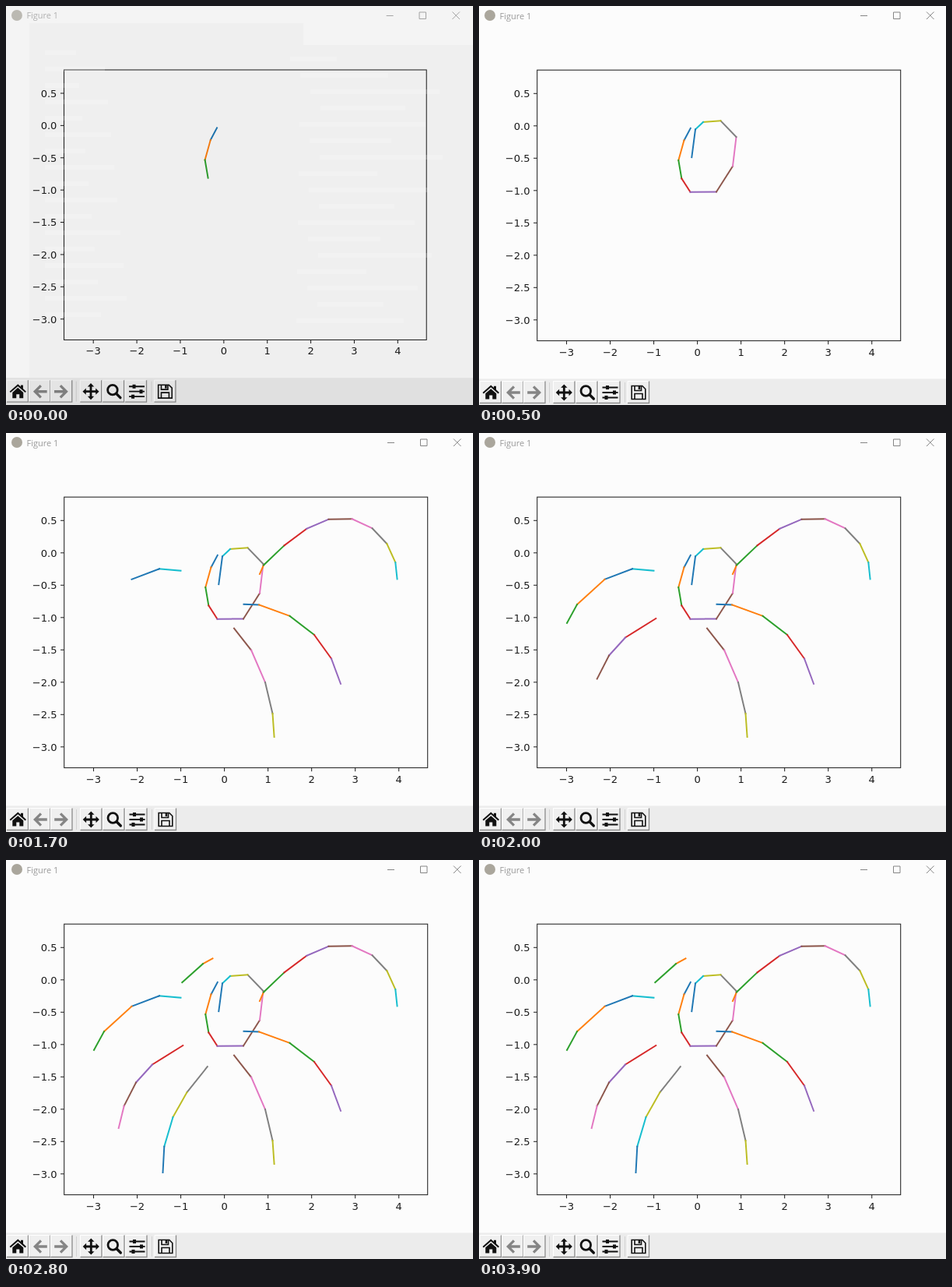
Write an HTML page that moves like this. It is 600 px wide and 512 px high and loops after 4 s.

```html
<!DOCTYPE html>
<html lang="en">
<head>
<meta charset="utf-8">
<title>Figure 1</title>
<style>
  html, body { margin: 0; width: 100%; height: 100%; overflow: hidden; background: #fcfcfc; }
  svg { display: block; width: 600px; height: 512px; }
  .title { font: 11px "Open Sans", "Noto Sans", sans-serif; fill: #999; }
  .labels { font: 13.08px "DejaVu Sans", sans-serif; fill: #1c1c1c; }
  .axes { fill: none; stroke: #222; stroke-width: 1.05; }
  .controls { fill: none; stroke: #858585; stroke-width: 1; }
  .plot { fill: none; stroke-width: 1.96; stroke-linecap: square; }
  .line { fill: none; stroke: #111; }
  .off { fill: #858585; }
</style>
</head>
<body>
<svg viewBox="0 0 600 512">
  <rect width="600" height="512" fill="#fcfcfc"/>
  <g id="window">
    <circle cx="14" cy="12" r="7" fill="#aaa69c"/>
    <text class="title" x="26.5" y="16.5">Figure 1</text>
    <path class="controls" d="M490 12.5h9M532.5 8h8.5v8.5h-8.5zM575 7.5l9.5 9.5M584.5 7.5l-9.5 9.5"/>

    <g class="axes" id="axes"><rect x="74.7" y="82.2" width="467" height="347.4"/></g>
    <g class="labels" id="labels"></g>
    <g class="plot" id="plot"></g>

    <rect y="478.5" width="604" height="37" fill="#ececec"/>
    <g id="buttons"></g>
    <path d="M90.5 483v26M187.5 483v26" stroke="#d2d2d2"/>

    <path d="M15.3 486.5l3.7 3.2v-2h3v4.6l4 3.7-1.3 1.4-9.4-8.2-9.4 8.2-1.3-1.4z" fill="#111"/>
    <path d="M15.3 491.2l7 6.1v7.2h-5v-5h-4v5h-5v-7.2z" fill="#111"/>
    <path id="arrow" class="off" d="M35 496l8.8-8.8 2.3 2.3-4.7 4.8h11.4v3.5H41.4l4.7 4.7-2.3 2.3z"/>
    <use href="#arrow" transform="matrix(-1 0 0 1 115 0)"/>
    <g transform="translate(109.3 496)" fill="#111">
      <path d="M-7-1.4H7v2.8H-7zM-1.4-7h2.8V7h-2.8z"/>
      <path id="tip" d="M0-10.6l4.2 4.4h-8.4z"/>
      <use href="#tip" transform="rotate(90)"/>
      <use href="#tip" transform="rotate(180)"/>
      <use href="#tip" transform="rotate(270)"/>
    </g>
    <circle class="line" cx="137.3" cy="494" r="6.3" stroke-width="2.8"/>
    <path class="line" d="M142.3 499l5 5" stroke-width="3.4" stroke-linecap="round"/>
    <path class="line" d="M158.5 489.5h20M158.5 496h20M158.5 502.5h20" stroke-width="1.9"/>
    <path class="line" d="M165 487v5M174 493.5v5M163.5 500v5" stroke-width="4"/>
    <path class="line" d="M196.2 487.5h13.6l4 4v13h-17.600zM200 504v-6.500h10v6.500M200 488v5.500h8.500v-5.500" stroke-width="1.6"/>
    <path d="M204.700 488h2.500v4h-2.500z" fill="#111"/>
  </g>

  <g id="fade">
    <rect width="600" height="512" fill="#000" opacity=".05"/>
    <path d="M0 0h600v22H0zM0 22h30v455H0zM382 22h218v28H382z" fill="#fff" opacity=".28"/>
    <path id="ghost" fill="none" stroke="#fff" stroke-width="6" opacity=".18"/>
  </g>
</svg>
<script>
const $ = id => document.getElementById(id);
const LOOP = 4000, STEP = 100;
const cycle = ['#1f77b4', '#ff7f0e', '#2ca02c', '#d62728', '#9467bd',
               '#8c564b', '#e377c2', '#7f7f7f', '#bcbd22', '#17becf'];

// Strokes of the drawing, in the order they appear
const strokes = [
  '271.8,156.8 263.5,172.3 256.3,198 260.3,221.3 271.5,238.7 305,238.5 326,205.5 330.5,168 310.5,147.3 288,149 278,158.3 273.3,194.2',
  '326,181 331,169.5 357.5,144.3 386,123 414.5,110.7 444.5,110.2 470.5,122.3 489.3,142 500.3,166 502.6,187.5',
  '305.5,219.7 325,220.5 364.5,234.8 396,259 418,289.5 430,321.8',
  '293,250.7 315,278.5 333,320 342.5,360 344.6,390',
  '224.5,176.7 197,174.3 161.5,187.8 126,220 113,243.8',
  '227.3,238 188,262.5 167,285.5 151.7,315.5 144.7,344',
  '258.8,265.2 232.5,298 214.5,330 203.3,367.7 201.5,401',
  '265.5,126.4 253,133.2 226.3,157'
];

function add(parent, tag, attrs, text = '') {
  const el = document.createElementNS('http://www.w3.org/2000/svg', tag);
  for (const key in attrs) el.setAttribute(key, attrs[key]);
  el.textContent = text;
  return parent.appendChild(el);
}

const minus = text => text.replace('-', '\u2212');

for (let v = -3; v <= 4; v++) {
  const x = 280.6 + v * 56.03;
  add($('axes'), 'path', { d: `M${x} 429.600v4.600` });
  add($('labels'), 'text', { x, y: 448.6, 'text-anchor': 'middle' }, minus(String(v)));
}
for (let i = -6; i <= 1; i++) {
  const y = 153.8 - i * 41.5;
  add($('axes'), 'path', { d: `M74.700 ${y}h-4.600` });
  add($('labels'), 'text', { x: 65.6, y: y + 4.9, 'text-anchor': 'end' }, minus((i / 2).toFixed(1)));
}

for (const x of [1, 29.5, 57.5, 95.5, 124.5, 153.5, 191]) {
  add($('buttons'), 'rect', { x, y: 481.5, width: 27.5, height: 28, fill: '#f0f0f0' });
  add($('buttons'), 'path', { d: `M${x} 509.500v-28h27.500`, fill: 'none', stroke: '#fff' });
  add($('buttons'), 'path', { d: `M${x} 509.500h27.500v-28`, fill: 'none', stroke: '#8c8c8c', 'stroke-width': 1.3 });
}

const segments = [];
for (const stroke of strokes) {
  const pts = stroke.split(' ');
  for (let i = 1; i < pts.length; i++) {
    segments.push(add($('plot'), 'path', {
      d: `M${pts[i - 1]}L${pts[i]}`,
      stroke: cycle[segments.length % cycle.length]
    }));
  }
}

// Faint rows of text showing through while the window opens
let rows = '';
for (let i = 0; i < 17; i++) {
  const y = 60 + i * 21;
  rows += `M50 ${y}h${40 + i * 37 % 70}M${365 + i * 13 % 40} ${y + 8}h${60 + i * 53 % 110}`;
}
$('ghost').setAttribute('d', rows);

function draw() {
  const step = Math.floor(performance.now() % LOOP / STEP);
  const shown = Math.floor(3 + step * 5 / 3);
  segments.forEach((s, i) => s.setAttribute('visibility', i < shown ? 'visible' : 'hidden'));
  $('window').setAttribute('transform', step ? '' : 'scale(.9973)');
  $('fade').setAttribute('visibility', step ? 'hidden' : 'visible');
  requestAnimationFrame(draw);
}
draw();
</script>
</body>
</html>
```
